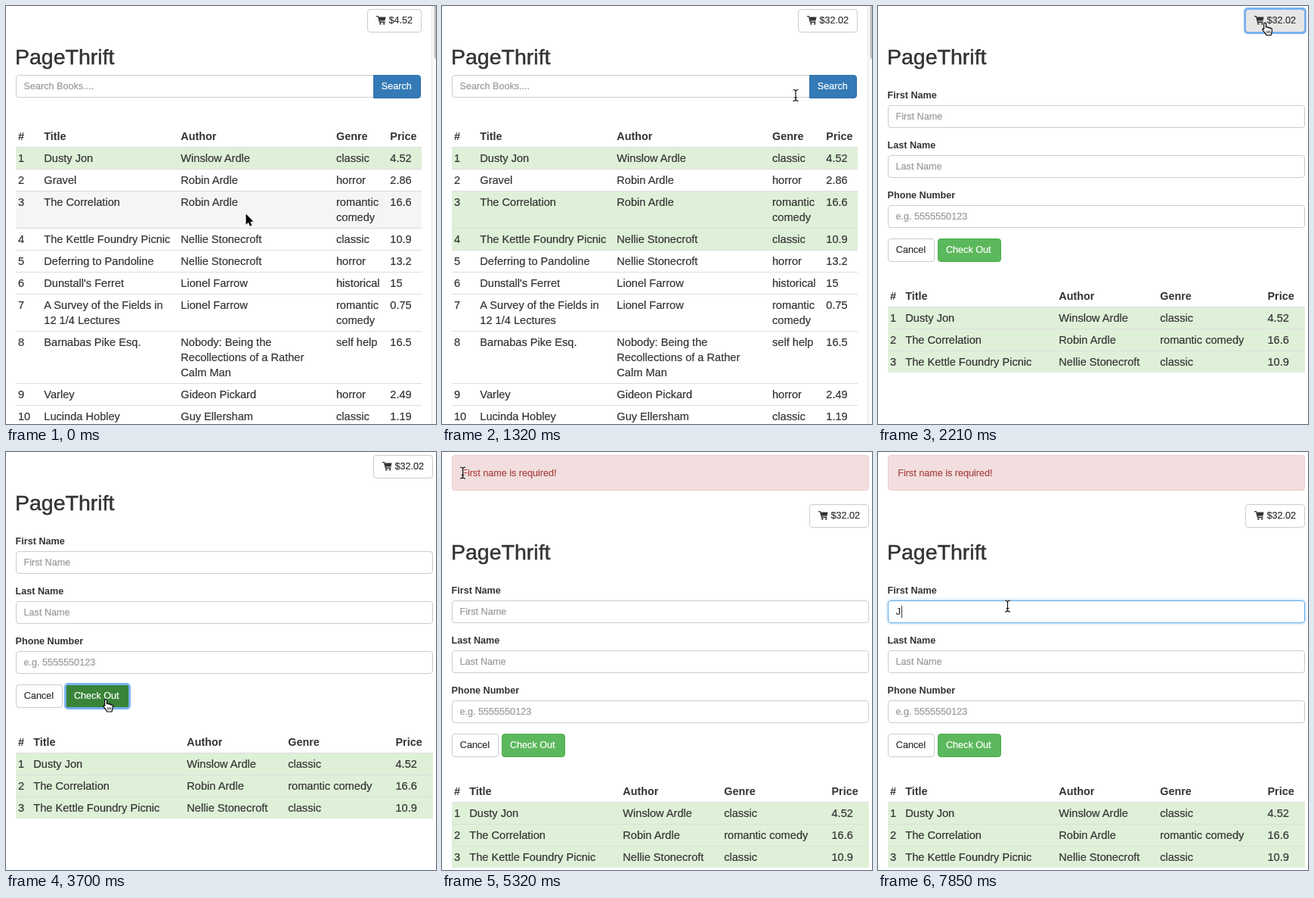
An HTML page for the animation above (8000 ms loop, 569 by 552 pixels).

```html
<!DOCTYPE html>
<html lang="en">
<head>
<meta charset="utf-8">
<title>PageThrift</title>
<style>
  html, body { margin: 0; width: 100%; height: 100%; overflow: hidden; background: #fff; }
  svg { display: block; font: 12.6px "Liberation Sans", Arial, sans-serif; color: #333; fill: #333; }
  text { white-space: pre; fill: currentColor; stroke: currentColor; stroke-width: .2; }
  .title { font-size: 28.5px; stroke-width: .5; }
  .cell { font-size: 14.6px; }
  .head { font-size: 14.4px; font-weight: bold; stroke-width: 0; }
  .label { font-weight: bold; stroke-width: 0; }
  .hint { color: #999; }
  .light { color: #fff; }
  .error { color: #a94442; }
  .glow { filter: drop-shadow(0 0 2px rgba(102, 175, 233, .7)); }
</style>
</head>
<body>
<svg id="stage" width="569" height="552" viewBox="0 0 569 552"></svg>
<script>
const LOOP = 8000;
const ALERT_SHIFT = 65;

// title lines, author lines, genre lines, price
const books = [
  ['Dusty Jon', 'Winslow Ardle', 'classic', 4.52],
  ['Gravel', 'Robin Ardle', 'horror', 2.86],
  ['The Correlation', 'Robin Ardle', 'romantic|comedy', 16.6],
  ['The Kettle Foundry Picnic', 'Nellie Stonecroft', 'classic', 10.9],
  ['Deferring to Pandoline', 'Nellie Stonecroft', 'horror', 13.2],
  ["Dunstall's Ferret", 'Lionel Farrow', 'historical', 15],
  ['A Survey of the Fields in|12 1/4 Lectures', 'Lionel Farrow', 'romantic|comedy', 0.75],
  ['Barnabas Pike Esq.', 'Nobody: Being the|Recollections of a Rather|Calm Man', 'self help', 16.5],
  ['Varley', 'Gideon Pickard', 'horror', 2.49],
  ['Lucinda Hobley', 'Guy Ellersham', 'classic', 1.19]
];

const text = (x, y, s, cls = '', more = '') =>
  `<text x="${x}" y="${y}" class="${cls}" ${more}>${s}</text>`;
const box = (x, y, w, h, fill, stroke, more = '') =>
  `<rect x="${x + .5}" y="${y + .5}" width="${w - 1}" height="${h - 1}" rx="3.5" fill="${fill}" stroke="${stroke}" ${more}/>`;
const ring = (id, x, y, w, h) =>
  `<rect id="${id}" x="${x - .5}" y="${y - .5}" width="${w + 1}" height="${h + 1}" rx="3.5" fill="none" stroke="#78b2f0" stroke-width="2.8"/>`;
const line = (x1, x2, y) => `<path d="M${x1} ${y + .5}H${x2}" stroke="#ddd"/>`;

function table(list, cols, right, top, prefix) {
  let y = top;
  const spans = [];
  let out = ['#', 'Title', 'Author', 'Genre', 'Price']
    .map((s, i) => text(cols[i], top - 9, s, 'head')).join('');
  list.forEach((book, i) => {
    const cells = [i + 1, ...book].map(c => String(c).split('|'));
    const h = 9 + 20 * Math.max(...cells.map(c => c.length));
    out += `<rect id="${prefix}${i}" x="13" y="${y}" width="${right - 13}" height="${h}" fill="#dff0d8"/>` + line(13, right, y);
    cells.forEach((c, k) => c.forEach((s, n) => {
      out += text(cols[k], y + 20 + 20 * n, s, 'cell');
    }));
    spans.push([y, y + h]);
    y += h;
  });
  return { out, spans };
}

const oneLine = book => book.map(c => String(c).replace('|', ' '));
const shop = table(books, [16, 50.3, 231.3, 437, 508.3], 550, 186, 'row');
const order = table([books[0], books[2], books[3]].map(oneLine),
  [16, 36.3, 239.3, 373.2, 515.5], 565, 397, 'item');

const field = (y, label, hint, id) =>
  text(12.6, y - 9, label, 'label') + box(13, y, 552, 30, '#fff', '#ccc', `id="${id}"`) +
  text(23.6, y + 19, hint, 'hint', `id="${id}Hint"`);

const beam = 'M-3.5-7.5Q-.5-7.5 0-5.5Q.5-7.5 3.5-7.5M0-5.5V5.5M-3.5 7.5Q-.5 7.5 0 5.5Q.5 7.5 3.5 7.5M-2 3H2';
const hand = 'M1.2 1.6C1.2-.4 4-.4 4 1.6V6.2C5 5.2 6.6 5.6 6.8 6.8C7.8 6 9.3 6.4 9.4 7.6C10.6 7 11.8 7.6 11.8 9V11.5C11.8 13.5 10.6 14 10.6 16.5H4.2C4.2 14.5 1.6 12.8.2 10.6C-1.6 8.4-.4 7.2 1.2 8.6Z';

document.getElementById('stage').innerHTML = `
<g id="alert">${box(13, 4, 552, 47, '#f2dede', '#ebccd1')}${text(26.2, 32, 'First name is required!', 'error')}</g>
<g id="page">
  ${text(12, 77, 'PageThrift', 'title')}
  <g id="shop">
    ${box(13, 91, 480, 30, '#fff', '#ccc')}
    ${text(23.6, 110, 'Search Books....', 'hint')}
    <path d="M486.5 91.5H545q3.5 0 3.5 3.5V118q0 3.5-3.5 3.5H486.5Z" fill="#337ab7" stroke="#2e6da4"/>
    ${text(496.8, 110, 'Search', 'light')}
    ${shop.out}
    <path d="M563 0H569V552H563Z" fill="#fafafa"/><path d="M563.5 0V552" stroke="#e7e7e7"/>
    <rect x="566.5" y="-6" width="8" height="76" rx="4" fill="#c1c1c1"/>
  </g>
  <g id="order">
    ${field(131, 'First Name', 'First Name', 'first')}
    ${field(197, 'Last Name', 'Last Name', 'last')}
    ${field(263, 'Phone Number', 'e.g. 5555550123', 'phone')}
    ${text(23.8, 150, 'J', '', 'id="typed"')}
    <rect id="caret" y="138" width="1" height="16"/>
    ${box(13, 307, 62, 31, '#fff', '#ccc')}${text(23.8, 326, 'Cancel')}
    ${box(79, 307, 84, 31, '', '', 'id="check"')}${ring('checkRing', 79, 307, 84, 31)}
    ${text(90, 326, 'Check Out', 'light')}
    ${order.out}
  </g>
  <g id="cartGroup">
    ${box(-79, 4, 79, 31, '', '', 'id="cart"')}${ring('cartRing', -79, 4, 79, 31)}
    <g id="icon"><path d="M0 .5H2.7L3.2 2H12.6L11.4 7H4.6L4.9 8.1H11.5V9.4H3.9L2 1.8H0Z"/>
      <circle cx="5.3" cy="10.9" r="1.2"/><circle cx="10.2" cy="10.9" r="1.2"/></g>
    ${text(-12, 23, '', '', 'id="total" text-anchor="end"')}
  </g>
</g>
<g id="pointer">
  <path id="arrow" d="M0 0V14.2L3.3 11.2 5.4 16.2 7.8 15.2 5.7 10.3H10Z" fill="#000" stroke="#fff" stroke-width="1.2" paint-order="stroke"/>
  <g id="beam" fill="none"><path d="${beam}" stroke="#fff" stroke-width="2.4" opacity=".7"/><path d="${beam}" stroke="#111" stroke-width="1.2"/></g>
  <g id="hand"><path d="${hand}" fill="#fff" stroke="#000" stroke-width="1.2" stroke-linejoin="round"/>
    <path d="M5.2 10.5V14M7.2 10.5V14M9.2 10.5V14" stroke="#000" stroke-width=".8"/></g>
</g>`;

// fill, border, focus ring
const cartLook = {
  idle: ['#fff', '#ccc', 0], hover: ['#e6e6e6', '#adadad', 0],
  press: ['#e6e6e6', '#adadad', 1], focus: ['#e6e6e6', '#8c8c8c', 1]
};
const checkLook = {
  idle: ['#5cb85c', '#4cae4c', 0], hover: ['#449d44', '#398439', 0],
  press: ['#398439', '#255625', 1], focus: ['#449d44', '#255625', 1]
};

// time, pointer x, y, pointer shape, state changes
const steps = [
  [0, 317.5, 274.5, 'arrow', { view: 'shop', picked: [0], cart: 'idle', check: 'idle', alert: 0, focus: 0, caret: 0, typed: 0 }],
  [300, 317.5, 274.5, 'arrow', { picked: [0, 2] }],
  [440, 321, 292, 'arrow'],
  [590, 324.5, 317, 'arrow'],
  [880, 324.5, 317, 'arrow', { picked: [0, 2, 3] }],
  [1030, 360, 262, 'arrow'],
  [1180, 425, 180, 'arrow'],
  [1320, 468, 118, 'beam'],
  [1470, 496, 72, 'arrow'],
  [1620, 510, 40, 'arrow'],
  [1770, 509.5, 22, 'hand', { cart: 'hover' }],
  [2070, 509.5, 22, 'hand', { cart: 'press' }],
  [2210, 509.5, 22, 'hand', { view: 'order' }],
  [2660, 470, 62, 'arrow', { cart: 'focus' }],
  [2810, 370, 150, 'beam'],
  [2960, 250, 240, 'arrow'],
  [3110, 170, 300, 'arrow'],
  [3250, 138, 322, 'hand', { check: 'hover' }],
  [3400, 129.5, 326.5, 'hand'],
  [3700, 129.5, 326.5, 'hand', { cart: 'idle', check: 'press' }],
  [3840, 129.5, 326.5, 'hand', { alert: 1, check: 'focus' }],
  [4440, 130, 312, 'arrow'],
  [4590, 122, 260, 'arrow'],
  [4740, 100, 180, 'arrow'],
  [4880, 72, 100, 'arrow'],
  [5030, 44, 48, 'arrow'],
  [5180, 30, 30, 'beam'],
  [5320, 27.5, 27.5, 'beam', { check: 'idle' }],
  [5470, 91, 29, 'beam'],
  [5610, 198, 24, 'arrow'],
  [6060, 207, 28, 'arrow'],
  [6210, 30, 30, 'beam'],
  [6360, 66, 92, 'arrow'],
  [6510, 130, 180, 'arrow'],
  [6660, 182, 252, 'arrow'],
  [6810, 177, 220, 'beam'],
  [6960, 171.5, 203.5, 'beam'],
  [7110, 171.5, 203.5, 'beam', { focus: 1, caret: 1 }],
  [7400, 171.5, 203.5, 'beam', { caret: 0 }],
  [7850, 171.5, 203.5, 'beam', { caret: 1, typed: 1 }]
];

let carried = {};
const states = steps.map(([at, x, y, shape, change]) => {
  carried = { ...carried, ...change };
  return { ...carried, at, x, y, shape };
});

const el = id => document.getElementById(id);
const set = (id, attrs) => Object.entries(attrs).forEach(([k, v]) => el(id).setAttribute(k, v));
const show = (id, on) => { el(id).style.display = on ? '' : 'none'; };

function paintButton(id, [fill, stroke, focused]) {
  set(id, { fill, stroke });
  show(id + 'Ring', focused);
}

function render(s) {
  const inShop = s.view === 'shop';
  show('shop', inShop);
  show('order', !inShop);
  show('alert', s.alert);
  set('page', { transform: `translate(0 ${s.alert ? ALERT_SHIFT : 0})` });

  shop.spans.forEach(([top, end], i) => {
    const hover = s.y >= top && s.y < end;
    const colors = s.picked.includes(i) ? ['#dff0d8', '#d0e9c6'] : ['#fff', '#f5f5f5'];
    set('row' + i, { fill: colors[+hover] });
  });

  const total = '$' + s.picked.reduce((sum, i) => sum + books[i][3], 0).toFixed(2);
  const width = total.length > 5 ? 79 : 72;
  el('total').textContent = total;
  set('cartGroup', { transform: `translate(${inShop ? 550 : 565} 0)` });
  set('cart', { x: .5 - width, width: width - 1 });
  set('icon', { transform: `translate(${12 - width} 12.5)` });
  paintButton('cart', cartLook[s.cart]);
  paintButton('check', checkLook[s.check]);

  set('first', { stroke: s.focus ? '#66afe9' : '#ccc', class: s.focus ? 'glow' : '' });
  show('firstHint', !s.typed);
  show('typed', s.typed);
  show('caret', s.caret);
  set('caret', { x: s.typed ? 31 : 24 });

  set('pointer', { transform: `translate(${s.x} ${s.y})` });
  ['arrow', 'beam', 'hand'].forEach(id => show(id, id === s.shape));
}

let shown;
const start = performance.now();
function tick() {
  const t = (performance.now() - start) % LOOP;
  const now = states.filter(s => s.at <= t).pop();
  if (now !== shown) render(shown = now);
  requestAnimationFrame(tick);
}
tick();
</script>
</body>
</html>
```
